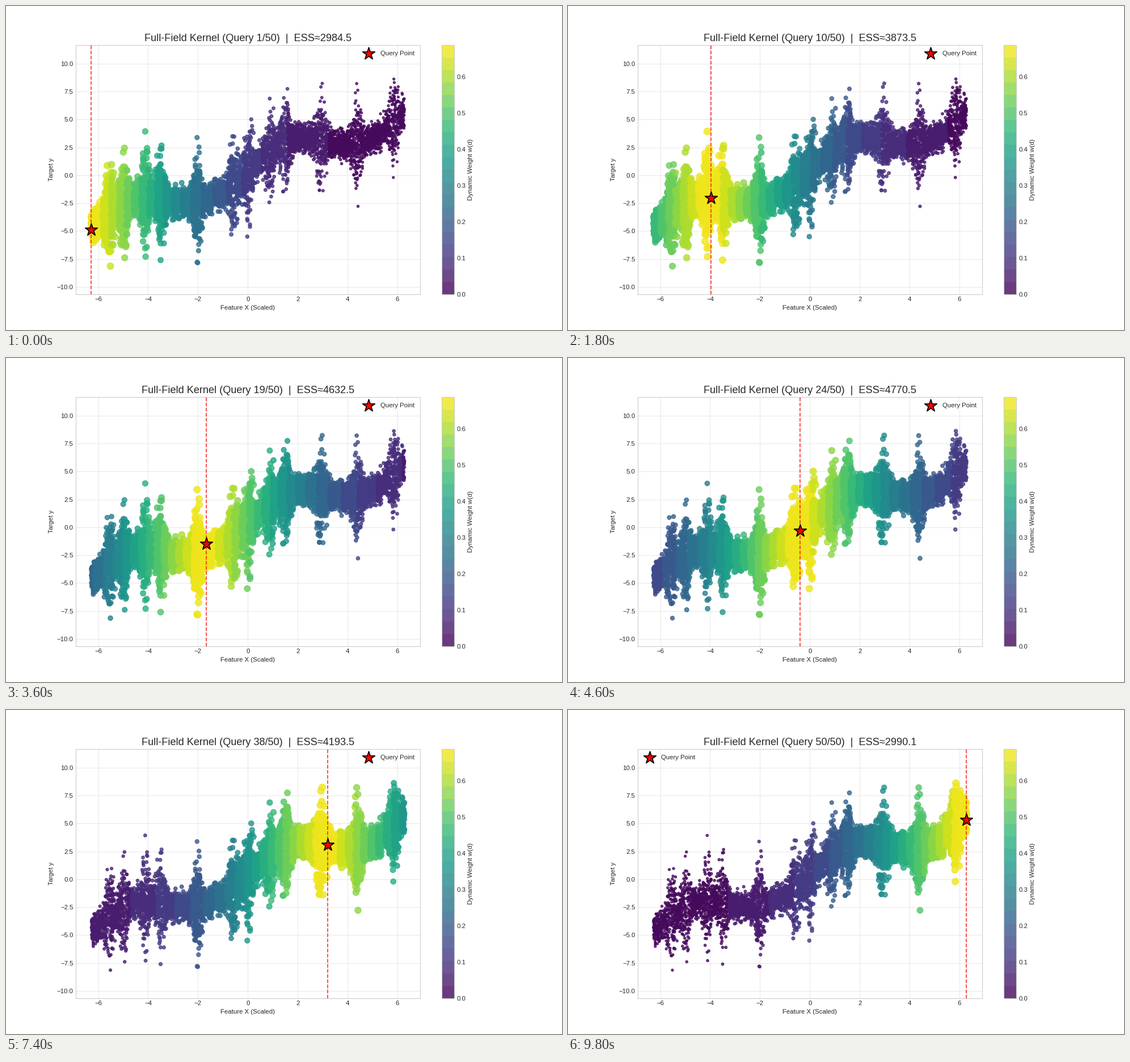
A matplotlib script for the animation above (10000 ms loop, 980 px wide and 572 px high).

```python
import numpy as np
import matplotlib.pyplot as plt
from matplotlib.animation import FuncAnimation
from matplotlib.colors import ListedColormap

plt.style.use("seaborn-v0_8-whitegrid")
plt.rcParams["font.family"] = "Liberation Sans"

STEPS = 50
POINTS = 5850
EDGE = 2 * np.pi
W_MAX = 0.688
SHADES = 20

# Effective sample size at a few queries, joined by a smooth curve
ESS_KEYS = {1: 2984.5, 10: 3873.5, 19: 4632.5, 30: 4702.1,
            38: 4193.5, 42: 3759.6, 50: 2990.1}

# Noise bursts come in evenly spaced runs: first centre, count
BURST_GAP = 1.46
BURST_RUNS = [(-5.57, 2), (-4.95, 5), (0.03, 5)]


def trend(x):
    return 0.4 + 0.83 * x + 1.3 * np.sin(x)


def spread(x):
    centres = [start + BURST_GAP * i
               for start, count in BURST_RUNS for i in range(count)]
    return 0.62 + sum(1.55 * np.exp(-0.5 * ((x - c) / 0.13) ** 2)
                      for c in centres)


def weight(q):
    return np.log1p(np.exp(-0.2 * np.abs(x - q) ** 1.25))


def area(w):
    return 12 + 150 * w


def ess_curve():
    num, val = np.array(list(ESS_KEYS.items())).T
    scale = lambda n: (n - 25.5) / 24.5
    fit = np.polyfit(scale(num), val, len(num) - 1)
    return np.polyval(fit, scale(np.arange(1, STEPS + 1)))


rng = np.random.default_rng(7)
x = np.sort(rng.uniform(-EDGE, EDGE, POINTS))
z = rng.normal(size=POINTS)
z = np.where(np.abs(z) > 2.9, z / 2, z)
y = trend(x) + spread(x) * z

qx = np.linspace(-EDGE, EDGE, STEPS)
qy = trend(qx) + 0.3 * rng.normal(size=STEPS)
ess = ess_curve()

shades = plt.get_cmap("viridis")((np.arange(SHADES) + 0.5) / SHADES)

fig, ax = plt.subplots(figsize=(12.0001, 7.0041), dpi=980 / 12)
w0 = weight(qx[0])
dots = ax.scatter(x, y, c=w0, s=area(w0), cmap=ListedColormap(shades),
                  vmin=0, vmax=W_MAX, alpha=0.8)
line = ax.axvline(qx[0], color="red", ls="--", lw=1.5, alpha=0.8, zorder=3)
star = ax.scatter([qx[0]], [qy[0]], marker="*", s=400, c="red",
                  edgecolors="black", linewidths=1.5, zorder=5,
                  label="Query Point")
fig.colorbar(dots, ax=ax, label="Dynamic Weight w(d)")
ax.set(xlim=(-1.1 * EDGE, 1.1 * EDGE), ylim=(-10.67, 11.69),
       xlabel="Feature X (Scaled)", ylabel="Target y")
ax.grid(True, alpha=0.5)
title = ax.set_title("", fontsize=16)
legend = ax.legend(loc="upper right")


def draw(i):
    w = weight(qx[i])
    dots.set_array(w)
    dots.set_sizes(area(w))
    line.set_xdata([qx[i], qx[i]])
    star.set_offsets([(qx[i], qy[i])])
    # The legend steps aside once the query line reaches it
    legend.set_loc("upper left" if qx[i] > 4.4 else "upper right")
    title.set_text(f"Full-Field Kernel (Query {i + 1}/{STEPS})  |  "
                   f"ESS≈{ess[i]:.1f}")
    return dots, line, star, title, legend


anim = FuncAnimation(fig, draw, frames=STEPS, interval=200, repeat=True)
plt.show()
```
